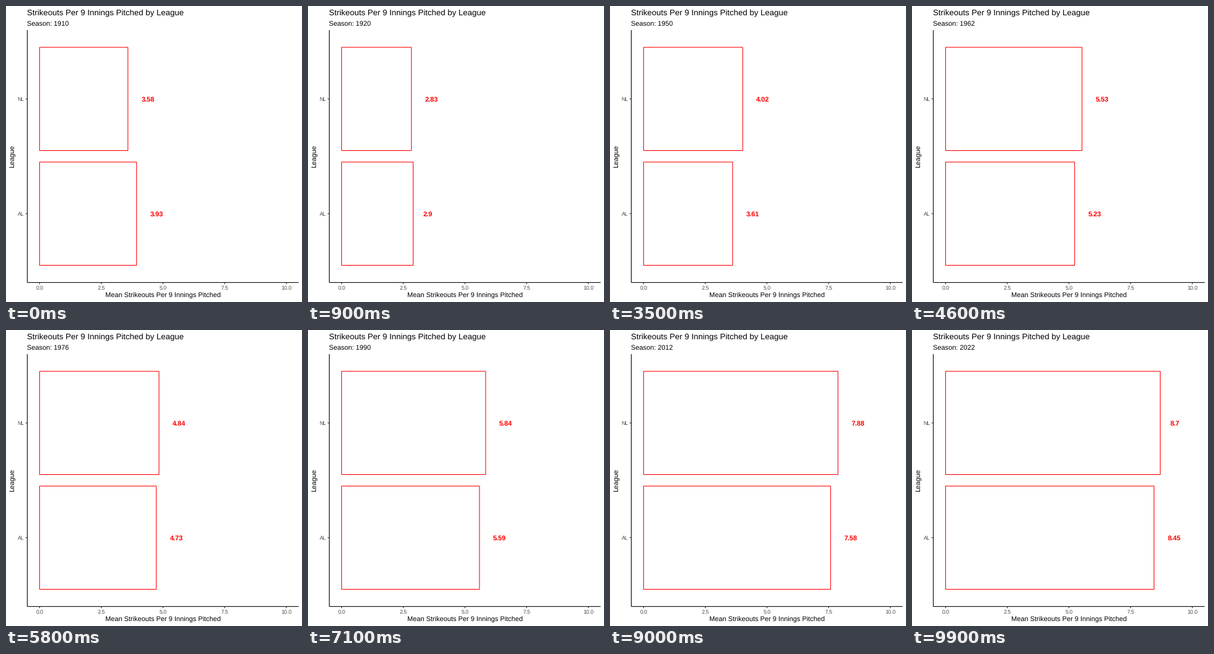
Recreate the animation shown at these times as a matplotlib script. Size 480 px wide and 480 px high, loop 10 s.

```python
import matplotlib.pyplot as plt
import numpy as np
from matplotlib.animation import FuncAnimation
from matplotlib.patches import Rectangle

SIZE, DPI = 480, 100
FRAMES, INTERVAL = 100, 100
PX = 72 / DPI  # points per pixel
FIRST, LAST = 1910, 2022

# Turning points of the trend: season, AL, NL
TREND = np.array([
    (1910, 3.93, 3.58), (1915, 3.75, 3.70), (1919, 2.95, 2.85),
    (1925, 2.65, 2.70), (1930, 3.30, 3.10), (1940, 3.75, 3.50),
    (1950, 3.61, 4.02), (1960, 4.90, 5.42), (1967, 6.07, 5.80),
    (1976, 4.73, 4.84), (1980, 4.33, 4.95), (1990, 5.59, 5.84),
    (2001, 6.40, 6.95), (2009, 6.70, 6.95), (2012, 7.58, 7.88),
    (2020, 9.10, 9.44), (2022, 8.45, 8.70),
])
SEASONS, AL, NL = TREND.T

LEFT, RIGHT, TOP, BOTTOM = 34.5, 474.5, 39.1, 448.4
ZERO, UNIT = 54.5, 40
ROW = (BOTTOM - TOP) / 2.2
BAR_H = 0.9 * ROW
LINE_W = 1.07 * PX
LABEL_SIZE = 11
GREY_TICK, GREY_TEXT = "#333333", "#4d4d4d"

plt.rcParams["font.family"] = "Liberation Sans"
plt.rcParams["text.hinting"] = "none"

fig = plt.figure(figsize=(SIZE / DPI, SIZE / DPI), dpi=DPI, facecolor="white")
ax = fig.add_axes([0, 0, 1, 1])
ax.set_xlim(0, SIZE)
ax.set_ylim(SIZE, 0)
ax.axis("off")


def write(x, y, text, size, color="black", ha="left", **kw):
    return ax.text(x, y, text, fontsize=size * PX, color=color, ha=ha,
                   va="baseline", **kw)


def line(x0, y0, x1, y1, color="black"):
    ax.plot([x0, x1], [y0, y1], color=color, lw=LINE_W,
            solid_capstyle="butt", snap=False)


def label_width(text):
    """Advance width of a number in bold type."""
    dots = text.count(".")
    return LABEL_SIZE * (0.556 * (len(text) - dots) + 0.278 * dots)


class Bar:
    def __init__(self, name, y, values):
        self.values = values
        line(LEFT - 2.75, y, LEFT, y, GREY_TICK)
        write(29.6, y + 3.2, name, 8.8, GREY_TEXT, "right")
        self.rect = Rectangle((ZERO, y - BAR_H / 2), 1, BAR_H, fc="white",
                              ec="red", lw=LINE_W, joinstyle="miter",
                              snap=False)
        ax.add_patch(self.rect)
        self.label = write(0, y + 4, "", LABEL_SIZE, "red", weight="bold")

    def show(self, season):
        value = round(float(np.interp(season, SEASONS, self.values)), 2)
        text = f"{value:g}"
        length = value * UNIT
        self.rect.set_width(length)
        self.label.set_text(text)
        self.label.set_x(ZERO + length + label_width(text) + 0.5)


write(LEFT, 15, "Strikeouts Per 9 Innings Pitched by League", 13.2)
subtitle = write(LEFT, 32, "", 11)
write((LEFT + RIGHT) / 2, 472.7, "Mean Strikeouts Per 9 Innings Pitched", 11,
      ha="center")
write(12.9, (TOP + BOTTOM) / 2, "League", 11, ha="center", rotation=90,
      rotation_mode="anchor")

for tick in np.linspace(0, 10, 5):
    x = ZERO + tick * UNIT
    line(x, BOTTOM, x, BOTTOM + 2.75, GREY_TICK)
    write(x, 460, f"{tick:.1f}", 8.8, GREY_TEXT, "center")

bars = [Bar("NL", TOP + 0.6 * ROW, NL), Bar("AL", TOP + 1.6 * ROW, AL)]
line(LEFT, TOP, LEFT, BOTTOM)
line(LEFT, BOTTOM, RIGHT, BOTTOM)


def update(i):
    season = round(FIRST + (LAST - FIRST) * i / (FRAMES - 1))
    subtitle.set_text(f"Season: {season}")
    for bar in bars:
        bar.show(season)
    return [subtitle]


anim = FuncAnimation(fig, update, frames=FRAMES, interval=INTERVAL,
                     repeat=True, repeat_delay=0)
plt.show()
```
